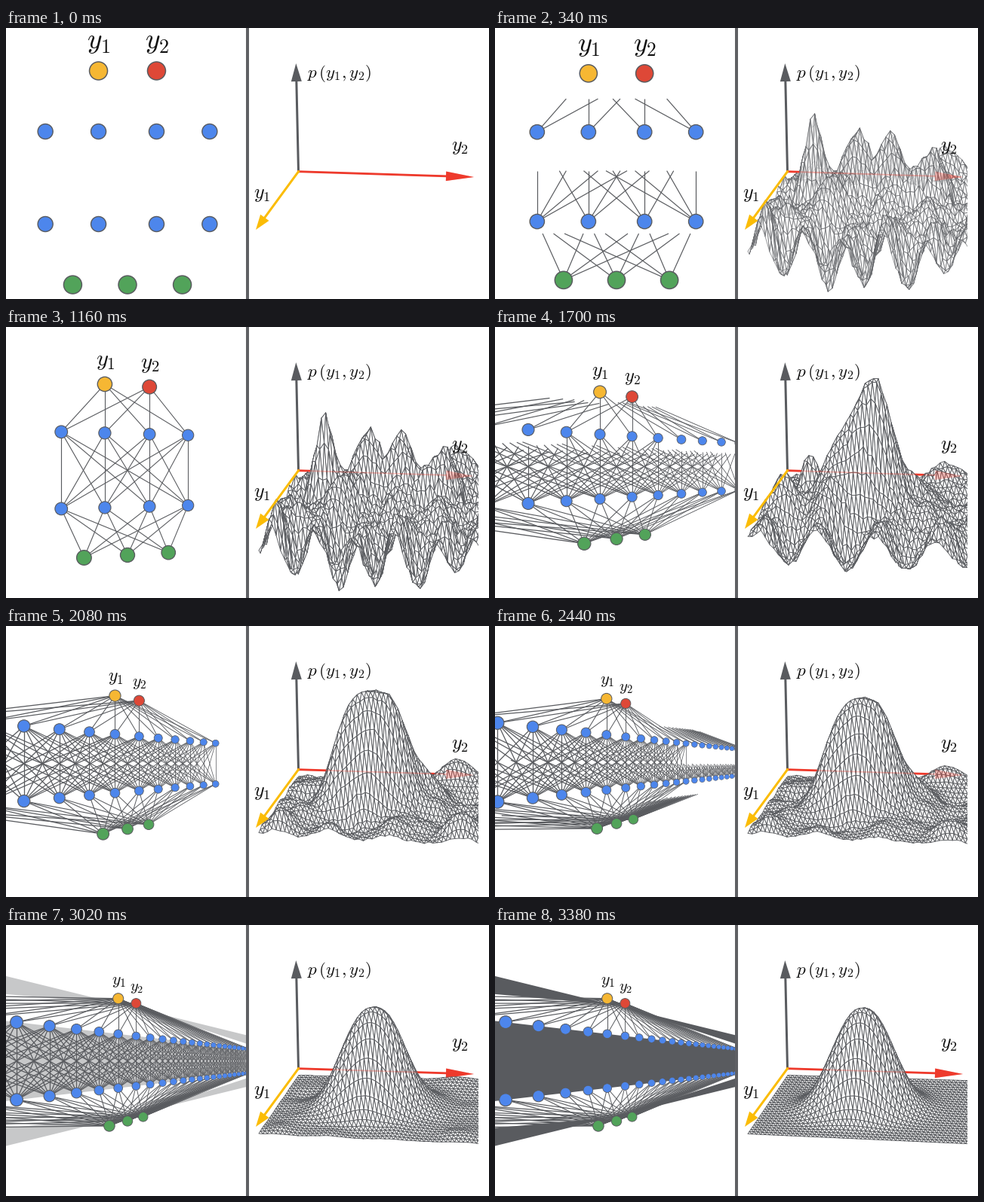
These frames come from a looping animation (640x360 px, 4000 ms). A matplotlib script:

```python
import numpy as np
import matplotlib.pyplot as plt
from matplotlib.animation import FuncAnimation
from matplotlib.collections import LineCollection, PolyCollection
from matplotlib.patches import Polygon, Rectangle

W, H, DPI = 640, 360, 100
STEP, LOOP, REST = 20, 4000, 3380
PX = 72 / DPI
INK, RED, GOLD, BLUE = "#595b5f", "#ee3a2c", "#fbbc05", "#4d86ec"

plt.rcParams["mathtext.fontset"] = "cm"
fig = plt.figure(figsize=(W / DPI, H / DPI), dpi=DPI, facecolor="white")
ax = fig.add_axes([0, 0, 1, 1])
ax.set_xlim(0, W)
ax.set_ylim(H, 0)
ax.axis("off")


def panel(x, w):
    return Rectangle((x, 0), w, H, transform=ax.transData)


def ramp(t, start, end):
    return float(np.clip((t - start) / (end - start), 0, 1))


def ease(t, start, end, power):
    s = ramp(t, start, end) ** power
    return s * s * (3 - 2 * s)


# ---- network: u runs along a layer, level is its height ----
def layer(n):
    return 0.53 + 0.97 * np.arange(n)


def birth(n):
    return np.digitize(np.arange(n), [2, 6])


RIGHT, LEFT, REACH = 17, 9, 5
hidden = np.r_[layer(RIGHT)[::-1], -layer(LEFT)]
stage = np.r_[birth(RIGHT)[::-1], birth(LEFT)]
order = np.arange(len(hidden))
linked = np.abs(np.subtract.outer(order, order)) <= REACH
outputs = np.array([-0.53, 0.53])
inputs = np.array([1.0, 0.0, -1.0])
OUT, MID, CX = 2.31, 1.0, 161

left = panel(0, 320)
wires = LineCollection([], colors=INK, zorder=2)
ax.add_collection(wires)
wires.set_clip_path(left)
fills = [ax.add_patch(Polygon(np.zeros((4, 2)), fc=INK, ec="none", zorder=2.2))
         for _ in range(3)]
for f in fills:
    f.set_clip_path(left)


def dots(colors, z):
    n = len(colors)
    sc = ax.scatter(np.zeros(n), np.zeros(n), c=colors, edgecolors=INK, zorder=z)
    sc.set_clip_path(left)
    return sc


upper = dots([BLUE] * len(hidden), 3)
lower = dots([BLUE] * len(hidden), 3)
base = dots(["#52a35a"] * 3, 3.1)
tops = dots(["#f6b733", "#de4837"], 3.2)
names = [ax.text(0, 0, f"$y_{i}$", ha="center", va="center", color="#111111", zorder=4)
         for i in (1, 2)]
ax.add_patch(Rectangle((318, 0), 4, H, fc="#5f6064", ec="none", zorder=6))


def fan(a, sa, b, sb, grow):
    """Segments from every a towards every b as far as grow, with their scale."""
    p0 = np.broadcast_to(a[:, None], (len(a), len(b), 2))
    p1 = p0 + grow[..., None] * (b[None] - p0)
    scale = np.add.outer(sa, sb) / 2
    return np.stack([p0, p1], 2)[grow > 0], scale[grow > 0]


def place(sc, pts, radius, alpha=1):
    sc.set_offsets(pts)
    sc.set_sizes((2 * radius * PX) ** 2)
    sc.set_linewidths(np.clip(radius * 0.14, 0.4, 1.5) * PX)
    sc.set_alpha(alpha)


def draw_network(t):
    # the camera backs away while it turns along the layers
    away = ease(t, 0, 2740, 0.85)
    turn = np.radians(56.8) * ease(t, 680, 2740, 0.78)
    h = 61.5 - 27 * away
    cy = 199 - 18.3 * away
    a = 1.18 * h * np.cos(turn)
    b = 0.0026 * h * np.sin(turn)

    def project(u, level):
        s = 1 / (1 + b * u)
        return np.c_[CX + a * u * s, cy + level * h * s], s

    up, s = project(hidden, -MID)
    low, _ = project(hidden, MID)
    top, s_top = project(outputs, -OUT)
    bot, s_bot = project(inputs, OUT)

    grow = np.array([ramp(t, 0, 600), ramp(t, 1170, 1850), ramp(t, 2200, 2800)])
    q = grow[stage]
    first = np.minimum(1.4 * q, 1)
    parts = [
        fan(bot, s_bot, low, s, np.tile(first, (3, 1))),
        fan(low, s, up, s, np.minimum.outer(q, q) * linked),
        fan(up, s, top, s_top, np.tile(q[:, None], (1, 2))),
    ]
    wires.set_segments(np.concatenate([p[0] for p in parts]))
    scale = np.concatenate([p[1] for p in parts])
    wires.set_linewidth((0.65 + h / 110) * PX * np.clip(scale, 0.4, 1.3))

    seen = np.clip(grow * 6, 0, 1)
    seen[0] = 1
    place(upper, up, 0.163 * h * s, seen[stage])
    place(lower, low, 0.163 * h * s, seen[stage])
    place(base, bot, 0.195 * h * s_bot)
    place(tops, top, 0.195 * h * s_top)
    for label, (x, y), k in zip(names, top, s_top):
        label.set_position((x + 0.5, y - 0.63 * h * k))
        label.set_fontsize(0.61 * h * k * PX)

    # the endless layers close into solid sheets
    solid = ramp(t, 2850, 3360)
    near, far = 1 + CX * b / a, 1 - (320 - CX) * b / a
    rim = 2.12
    band = np.array([(0, rim * near), (320, rim * far), (320, 1.41 * far),
                     (176, rim * 0.955), (148, rim * 1.035), (0, 1.67 * near)])
    core = np.array([(0, near), (320, far), (320, -far), (0, -near)])
    for f, shape, sign in zip(fills, (core, band, band), (1, 1, -1)):
        f.set_xy(np.c_[shape[:, 0], cy - sign * h * shape[:, 1]])
        f.set_alpha(solid)
        f.set_visible(solid > 0)


# ---- axes of the density plot ----
def arrow(tail, tip, color, head, half, width, z=1, alpha=1):
    tail, tip = np.array(tail, float), np.array(tip, float)
    d = (tip - tail) / np.hypot(*(tip - tail))
    n = np.array([-d[1], d[0]])
    neck = tip - head * d
    ax.plot(*zip(tail, neck), color=color, lw=width * PX, zorder=z, alpha=alpha)
    ax.add_patch(Polygon([tip, neck + half * n, neck - half * n], fc=color,
                         ec="none", zorder=z, alpha=alpha))


ORIGIN = (387.5, 190.7)
arrow(ORIGIN, (384.3, 47), INK, 24, 7, 3)
arrow(ORIGIN, (620, 198), RED, 37, 6.3, 2.8)
arrow(ORIGIN, (620, 198), RED, 37, 6.3, 1.8, z=3, alpha=0.3)
arrow(ORIGIN, (331, 268), GOLD, 20, 7, 3, z=3)
for x, y, text, size in ((441.7, 61, r"$p\,(y_1,y_2)$", 23),
                         (339, 220, "$y_1$", 26), (601.5, 156.5, "$y_2$", 26)):
    ax.text(x, y, text, fontsize=size * PX, ha="center", va="center",
            color="#111111", zorder=5)

# ---- density surface ----
COLS, ROWS = 52, 26
U, V = np.meshgrid(np.linspace(0, 1, COLS + 1), np.linspace(0, 1, ROWS + 1))
FLOOR_X = 388 - 53 * V + 300 * U
FLOOR_Y = 199.5 + 78 * V + 300 * U * (0.03 + 0.015 * V)


def bump(u, v, height, width):
    return height * np.exp(-((U - u) ** 2 + ((V - v) * 0.7) ** 2) / (2 * width ** 2))


def troughs(first, period, depth):
    """Regular dips along the front edge."""
    wave = (1 + np.cos(2 * np.pi * (U - first) / period)) / 2
    return -depth * wave * np.exp(-((V - 0.9) / 0.16) ** 2)


rng = np.random.default_rng(4)
rough = rng.normal(size=U.shape)
waves = sum(bump(*rng.random(2), rng.normal(), 0.045) for _ in range(80))
waves /= waves.std()

radius = np.hypot((U - 0.42) / 0.13, (V - 0.5) / 0.15)
bell = 133 * np.exp(-0.5 * radius ** 2.3)

wild = (4 * rough + 13 * waves + troughs(0.14, 0.183, 72) + bump(0.163, 0.3, 110, 0.042)
        + bump(0.35, 0.26, 95, 0.06) + bump(0.5, 0.26, 80, 0.05)
        + bump(0.72, 0.3, 58, 0.05))
rising = (2.5 * rough + 7 * waves + troughs(0.165, 0.26, 45) + 0.75 * bell
          + bump(0.46, 0.47, 78, 0.065) + bump(0.152, 0.35, 62, 0.04)
          + bump(0.09, 0.6, 50, 0.05) + bump(0.305, 0.75, 40, 0.05))
calm = rough + 8 * waves + 1.2 * bell
settling = 0.3 * rough + 2 * waves + 1.02 * bell
SHAPES = ((0, wild), (1200, wild), (1700, rising), (2050, calm),
          (2220, calm), (2740, settling), (REST, bell))


def height_at(t):
    for (t0, z0), (t1, z1) in zip(SHAPES, SHAPES[1:]):
        if t < t1:
            return z0 + (z1 - z0) * (t - t0) / (t1 - t0)
    return bell


mesh = PolyCollection([], facecolors="white", edgecolors=INK, linewidths=0.9 * PX,
                      zorder=2)
ax.add_collection(mesh)
mesh.set_clip_path(panel(322, 304))


def draw_surface(t):
    fade = ramp(t, 0, 520)
    mesh.set_visible(fade > 0)
    mesh.set_alpha(fade)
    p = np.stack([FLOOR_X, FLOOR_Y - height_at(t)], -1)
    a, b, c, d = p[:-1, :-1], p[:-1, 1:], p[1:, 1:], p[1:, :-1]
    pair = np.stack([np.stack([a, b, c], 2), np.stack([a, c, d], 2)], 2)
    mesh.set_verts(pair.reshape(-1, 3, 2))


def update(i):
    t = min(i * STEP, REST)
    draw_network(t)
    draw_surface(t)
    return []


anim = FuncAnimation(fig, update, frames=LOOP // STEP, interval=STEP,
                     init_func=lambda: update(0), repeat=True, repeat_delay=0)
plt.show()
```
